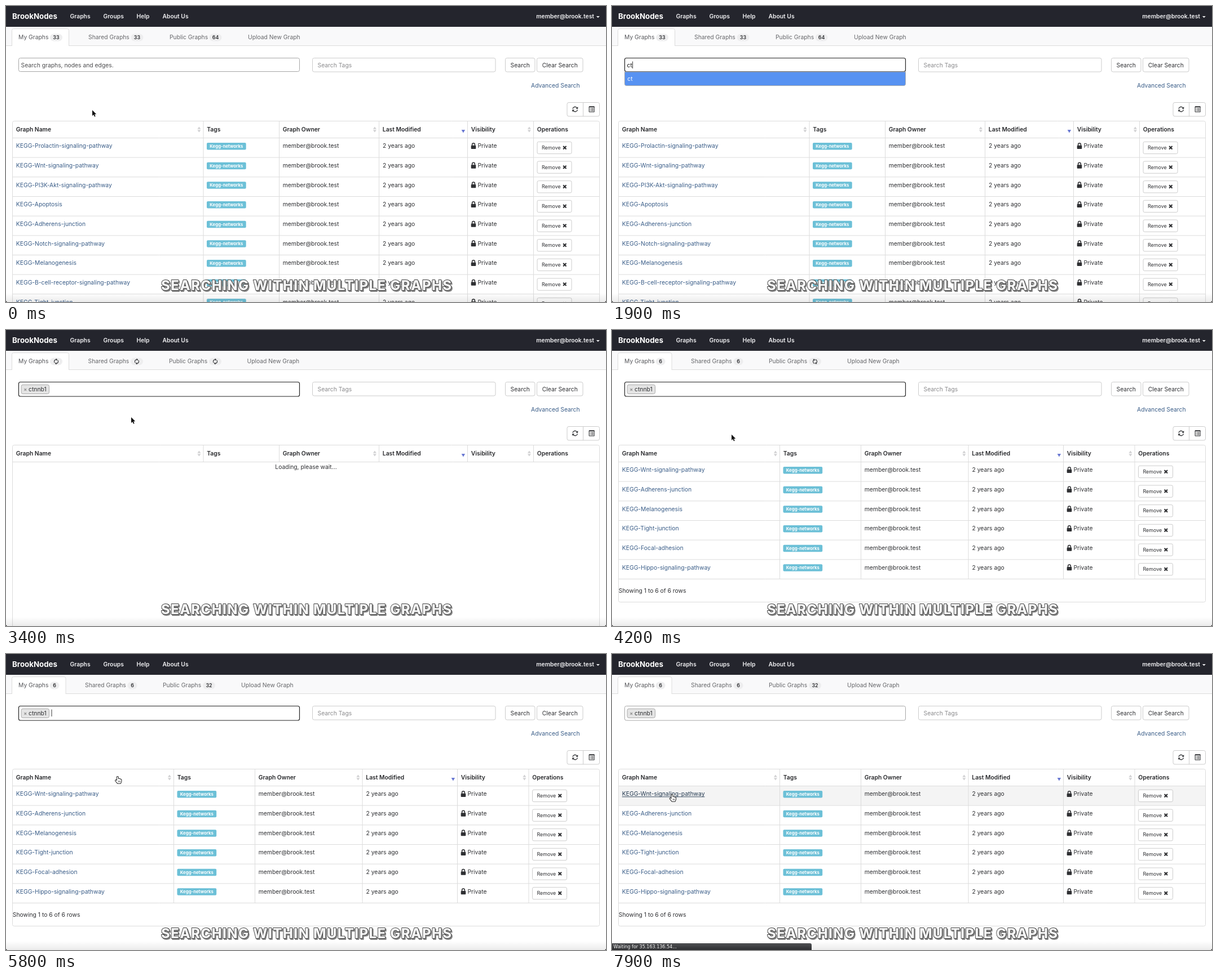
These frames come from a looping animation (1064x526 px, 8000 ms). An HTML page with a canvas:

```html
<!DOCTYPE html>
<html lang="en">
<head>
<meta charset="utf-8">
<title>Searching within multiple graphs</title>
<style>
html, body { margin: 0; width: 100%; height: 100%; overflow: hidden; background: #fff; }
canvas { display: block; width: 1064px; height: 526px; }
</style>
</head>
<body>
<canvas id="stage"></canvas>
<script>
const W = 1064, H = 526, LOOP = 8000, STEP = 100;
const canvas = document.getElementById('stage');
const ctx = canvas.getContext('2d');
const dpr = window.devicePixelRatio || 1;
canvas.width = W * dpr;
canvas.height = H * dpr;

const SANS = 'Inter, "Open Sans", sans-serif';
const BASE = 10.34, SMALL = 8.87;
const INK = '#2f3033', LINK = '#3a5d88', LINE = '#dcdcdc';
const USER = 'member@brook.test';

// Moments of the story, in ms
const T = { click: 1000, type: 1600, key: 160, enter: 3000, rows: 4200, count: 5400, hover: 6450, open: 7100 };

const FULL = {
  cols: [11.5, 350, 484.5, 661.5, 818.5, 935.5, 1052.5],
  rows: ['Prolactin-signaling-pathway', 'Wnt-signaling-pathway', 'PI3K-Akt-signaling-pathway', 'Apoptosis',
    'Adherens-junction', 'Notch-signaling-pathway', 'Melanogenesis', 'B-cell-receptor-signaling-pathway', 'Tight-junction'],
  tabs: [22, 146, 290, 429], badges: [89, 232.5, 371.5], edge: 111.5
};
const BUSY = { cols: FULL.cols, rows: [], tabs: [22, 145.5, 289, 427.5], badges: [89, 232, 371], edge: 111.5 };
const FOUND = {
  cols: [11.5, 297.5, 441.5, 632, 800.5, 927, 1052.5],
  rows: ['Wnt-signaling-pathway', 'Adherens-junction', 'Melanogenesis', 'Tight-junction', 'Focal-adhesion', 'Hippo-signaling-pathway'],
  tabs: [22, 140, 278, 417], badges: [86, 224, 360], edge: 106
};
const HEADS = ['Graph Name', 'Tags', 'Graph Owner', 'Last Modified', 'Visibility', 'Operations'];
const TOP = 234.5, PITCH = 34.67;

// Pointer tip: time, x, y
const PATH = [[0, 153, 185], [200, 153, 185], [900, 114, 110.5], [3000, 114, 110.5], [3400, 222, 155],
  [3900, 222, 155], [4500, 202, 216.5], [5700, 202, 216.5], [6500, 106.5, 250]];

function text(s, x, y, { size = BASE, weight = 400, color = INK, align = 'left', font = SANS } = {}) {
  ctx.font = `${weight} ${size}px ${font}`;
  ctx.fillStyle = color;
  ctx.textAlign = align;
  ctx.fillText(s, x, y + size * 0.36);
  return ctx.measureText(s).width;
}

function box(x, y, w, h, { r = 0, fill, stroke, lw = 1 } = {}) {
  ctx.beginPath();
  ctx.roundRect(x, y, w, h, r);
  if (fill) { ctx.fillStyle = fill; ctx.fill(); }
  if (stroke) { ctx.strokeStyle = stroke; ctx.lineWidth = lw; ctx.stroke(); }
}

function line(x1, y1, x2, y2, color = LINE, lw = 1) {
  ctx.beginPath();
  ctx.moveTo(x1, y1);
  ctx.lineTo(x2, y2);
  ctx.strokeStyle = color;
  ctx.lineWidth = lw;
  ctx.stroke();
}

function shape(points, fill, stroke, lw = 1) {
  ctx.beginPath();
  points.forEach(([x, y]) => ctx.lineTo(x, y));
  ctx.closePath();
  if (stroke) { ctx.strokeStyle = stroke; ctx.lineWidth = lw; ctx.stroke(); }
  ctx.fillStyle = fill;
  ctx.fill();
}

const triangle = (x, y, w, h, color) => shape([[x - w, y], [x + w, y], [x, y + h]], color);

function cross(x, y, r, color, lw) {
  line(x - r, y - r, x + r, y + r, color, lw);
  line(x - r, y + r, x + r, y - r, color, lw);
}

function refresh(x, y, r, angle = 0) {
  ctx.save();
  ctx.translate(x, y);
  ctx.rotate(angle);
  for (let i = 0; i < 2; i++) {
    ctx.beginPath();
    ctx.arc(0, 0, r, Math.PI * 1.06, Math.PI * 1.8);
    ctx.strokeStyle = INK;
    ctx.lineWidth = r * 0.34;
    ctx.stroke();
    shape([[r * 1.2, -r * 1.05], [r * 1.2, -r * 0.15], [r * 0.3, -r * 0.15]], INK);
    ctx.rotate(Math.PI);
  }
  ctx.restore();
}

function lock(x, y) {
  box(x, y - 0.8, 8.6, 6.3, { r: 1, fill: INK });
  ctx.beginPath();
  ctx.moveTo(x + 1.9, y);
  ctx.lineTo(x + 1.9, y - 2.4);
  ctx.arc(x + 4.3, y - 2.4, 2.4, Math.PI, 0);
  ctx.lineTo(x + 6.7, y);
  ctx.strokeStyle = INK;
  ctx.lineWidth = 1.5;
  ctx.stroke();
}

function navbar() {
  box(0, 0, W, 37, { fill: '#24252d' });
  const style = { weight: 600, color: '#f1f1f3' };
  text('BrookNodes', 11, 18.2, { ...style, size: 13.3, weight: 700, color: '#fff' });
  [['Graphs', 113.5], ['Groups', 172.5], ['Help', 231.5], ['About Us', 277.5]]
    .forEach(([s, x]) => text(s, x, 18.5, style));
  text(USER, 1043, 18.5, { ...style, align: 'right' });
  triangle(1049.8, 18, 3, 3, '#f1f1f3');
}

function tabs(view, counts, t) {
  box(0, 37, W, 33.5, { fill: '#f9f9fa' });
  line(0, 70.5, W, 70.5);
  box(10.5, 40.5, view.edge - 10.5, 36, { r: 3, fill: '#fff', stroke: LINE });
  box(9, 71, view.edge - 7, 8, { fill: '#fff' });
  ['My Graphs', 'Shared Graphs', 'Public Graphs', 'Upload New Graph']
    .forEach((s, i) => text(s, view.tabs[i], 55.5, { color: i ? '#66676a' : '#55565a' }));
  view.badges.forEach((x, i) => {
    const n = counts[i], w = n.length === 1 ? 17 : 22;
    box(x - w / 2, 49.5, w, 13, { r: 6.5, fill: '#eeeeef' });
    if (n === '..') refresh(x, 56, 3.5, (t - 4700) / 2000 * Math.PI * 2);
    else text(n, x, 56, { size: SMALL, weight: 600, align: 'center' });
  });
}

function button(s, x, w) {
  box(x, 92.5, w, 24.5, { r: 3, fill: '#fff', stroke: '#ccc' });
  text(s, x + w / 2, 105, { align: 'center' });
}

function searchBar(t) {
  const focus = t >= T.click && t < T.open;
  const tagged = t >= T.enter;
  const typed = 'ctnnb1'.slice(0, Math.max(0, Math.floor((t - T.type) / T.key) + 1));
  const blink = (t + 350) % 1000 < 500;
  box(22.5, 92.5, 498, tagged ? 25.5 : 24, { r: 3, fill: '#fff', stroke: focus ? '#222' : '#a6a6a6', lw: focus ? 1.2 : 1 });
  if (tagged) {
    box(27, 97.3, 49.5, 16.2, { r: 3, fill: '#e4e4e4', stroke: '#aaa' });
    cross(34.3, 106, 1.8, '#8b8b8b', 1.2);
    text('ctnnb1', 40, 105.7);
    if (focus && blink) line(81, 98.5, 81, 111, '#222', 0.9);
  } else if (typed) {
    const w = text(typed, 26.5, 105, { color: '#111' });
    if (blink || t < T.type + 6 * T.key) line(27.3 + w, 98.5, 27.3 + w, 111, '#222', 0.9);
  } else {
    text('Search graphs, nodes and edges.', 26.5, 105, { color: focus ? '#666' : '#4c4c4e' });
    if (focus && blink) line(27, 98.5, 27, 111, '#222', 0.9);
  }
  box(543.5, 92.5, 324.5, 24.5, { r: 3, fill: '#fff', stroke: '#ccc' });
  text('Search Tags', 552.5, 105, { color: '#8a8a8c' });
  button('Search', 885.5, 52.5);
  button('Clear Search', 941.5, 81.5);
  text('Advanced Search', 931, 141, { color: LINK });
  if (focus && !tagged) {
    box(22.5, 117, 498, 24.5, { r: [0, 0, 3, 3], fill: typed ? '#5792f2' : '#fff', stroke: '#aaa' });
    text(typed || 'No results found', 27.3, 129.3, { color: typed ? '#fff' : INK });
  }
}

function toolbar() {
  box(995, 171.5, 57.5, 24.5, { r: 3, fill: '#fff', stroke: '#ccc' });
  line(1023.5, 171.5, 1023.5, 196, '#ccc');
  refresh(1009.2, 183.5, 4.2);
  box(1034, 178.8, 9.2, 9.4, { stroke: INK });
  line(1034, 179.3, 1043.2, 179.3, INK, 1.6);
  for (let y = 182; y < 188; y += 2) {
    line(1035.3, y, 1036.5, y, INK, 0.9);
    line(1037.4, y, 1042, y, INK, 0.9);
  }
}

function row(view, name, i, hover) {
  const y = TOP + i * PITCH, mid = y + 14, c = view.cols;
  if (hover) box(12, y + 0.5, 1040, PITCH - 1, { fill: '#f4f4f4' });
  const color = hover ? '#22384f' : LINK;
  const w = text('KEGG-' + name, c[0] + 6.3, mid, { color });
  if (hover) line(c[0] + 6.3, mid + 5.3, c[0] + 6.3 + w, mid + 5.3, color, 0.9);
  box(c[1] + 6, mid - 5.5, 69.7, 12.5, { r: 2, fill: '#6cc0d7' });
  text('Kegg-networks', c[1] + 40.9, mid + 0.8, { size: 7.76, weight: 700, color: '#fff', align: 'center' });
  text(USER, c[2] + 6.3, mid);
  text('2 years ago', c[3] + 6.5, mid);
  lock(c[4] + 6.2, mid);
  text('Private', c[4] + 18, mid);
  box(c[5] + 6.5, y + 6.8, 61, 21.3, { r: 2.5, fill: '#fff', stroke: '#ccc' });
  text('Remove', c[5] + 14.5, y + 17.4, { size: SMALL });
  cross(c[5] + 55.3, y + 17.2, 2.7, INK, 2.1);
  line(c[0], y + PITCH, c[6], y + PITCH);
}

function table(view, t) {
  const c = view.cols;
  const found = view === FOUND, busy = view === BUSY;
  const end = found ? 483.5 : 540;
  box(11.5, 204.5, 1041, end - 204.5, { r: 3, stroke: LINE });
  view.rows.forEach((name, i) => row(view, name, i, found && i === 0 && t >= T.hover - 50));
  line(11.5, TOP, 1052.5, TOP);
  const bottom = busy ? TOP : found ? TOP + 6 * PITCH : H;
  c.slice(1, 6).forEach(x => line(x, 204.5, x, bottom));
  HEADS.forEach((s, i) => {
    text(s, c[i] + 6.3, 219.5, { weight: 600, color: '#26272a' });
    const x = c[i + 1] - 7.6;
    if (i === 3) triangle(x, 220, 3.2, 5.5, '#6877d2');
    else if (i === 0 || i === 2 || i === 4) {
      triangle(x, 218.8, 3, -4.2, '#d0d0d2');
      triangle(x, 220.3, 3, 4.2, '#d0d0d2');
    }
  });
  if (busy) text('Loading, please wait...', 532, 243.3, { align: 'center' });
  if (found) text('Showing 1 to 6 of 6 rows', 11.8, 463.3);
}

function shade() {
  const g = ctx.createLinearGradient(0, 510, 0, H);
  g.addColorStop(0, 'rgba(0,0,0,0)');
  g.addColorStop(1, 'rgba(0,0,0,.08)');
  box(0, 510, W, 16, { fill: g });
  shape([[0, 524], [2, 526], [0, 526]], '#222');
  shape([[W, 524], [W - 2, 526], [W, 526]], '#222');
}

function statusBar(t) {
  if (t < T.hover) return;
  const g = ctx.createLinearGradient(0, 514, 0, H);
  g.addColorStop(0, '#505154');
  g.addColorStop(1, '#2c2d30');
  box(0, 514, 354, 12, { r: [0, 3, 0, 0], fill: g });
  text(t < T.open ? '35.163.136.54/graphs/11761?query=ctnnb1' : 'Waiting for 35.163.136.54...', 2.5, 520,
    { size: 8, color: '#f4f4f4', font: '"DejaVu Sans", sans-serif' });
}

function caption() {
  const s = 'SEARCHING WITHIN MULTIPLE GRAPHS', x = 275, y = 505;
  ctx.save();
  ctx.font = `800 24px ${SANS}`;
  ctx.letterSpacing = '1.4px';
  ctx.textAlign = 'left';
  ctx.lineJoin = 'round';
  ctx.lineWidth = 1.8;
  ctx.strokeStyle = ctx.fillStyle = '#858585';
  ctx.fillText(s, x + 2.2, y + 2.2);
  ctx.strokeText(s, x + 1.6, y + 1.6);
  ctx.strokeStyle = '#404040';
  ctx.strokeText(s, x, y);
  ctx.fillStyle = '#f5f5f5';
  ctx.fillText(s, x, y);
  ctx.restore();
}

function pointerAt(t) {
  const i = PATH.findIndex(p => p[0] > t);
  if (i < 0) return PATH[PATH.length - 1].slice(1);
  const [t0, x0, y0] = PATH[i - 1], [t1, x1, y1] = PATH[i];
  const u = (t - t0) / (t1 - t0), k = u * u * (3 - 2 * u);
  return [x0 + (x1 - x0) * k, y0 + (y1 - y0) * k];
}

function arrow() {
  shape([[0, 0], [0, 10.2], [2.3, 8.1], [4, 11.8], [5.7, 11], [4.1, 7.4], [7.2, 7.2]], '#111', '#fff', 1.6);
}

function beam() {
  for (const [color, lw] of [['#fff', 2.4], ['#222', 1.1]]) {
    line(0, -5, 0, 5.5, color, lw);
    for (const d of [-1, 1]) {
      line(-2.6, d * 6.3, 0, d * 5, color, lw);
      line(2.6, d * 6.3, 0, d * 5, color, lw);
    }
  }
}

function hand() {
  ctx.lineJoin = 'round';
  shape([[-1, 0.2], [0.8, 0.2], [1, 4], [2.6, 3.6], [3.2, 4.4], [4.6, 4.2], [5.1, 5], [6.4, 5.2], [6.6, 8],
    [5.3, 11.8], [0, 11.8], [-3.8, 7.2], [-3.2, 6], [-1, 7.4]], '#fff', '#222', 2);
  [1.6, 3, 4.4].forEach(x => line(x, 7.2, x, 9.8, '#444', 0.7));
}

function pointer(t) {
  if (t >= T.type && t < T.enter + 100) return;
  const [x, y] = pointerAt(t);
  const inField = y > 92 && y < 118;
  const onHead = y > 204 && y < TOP && t > T.rows;
  ctx.save();
  ctx.translate(x, y);
  if (inField) beam();
  else if (onHead || t >= T.hover - 50) hand();
  else arrow();
  ctx.restore();
}

function draw(t) {
  const view = t < T.enter ? FULL : t < T.rows ? BUSY : FOUND;
  const counts = view === FULL ? ['33', '33', '64'] : view === BUSY ? ['..', '..', '..']
    : ['6', '6', t < T.count ? '..' : '32'];
  ctx.setTransform(dpr, 0, 0, dpr, 0, 0);
  box(0, 0, W, H, { fill: '#fff' });
  navbar();
  tabs(view, counts, t);
  toolbar();
  searchBar(t);
  table(view, t);
  shade();
  statusBar(t);
  caption();
  pointer(t);
}

const start = performance.now();
function tick() {
  const t = Math.max(0, performance.now() - start) % LOOP;
  draw(Math.floor(t / STEP) * STEP);
  requestAnimationFrame(tick);
}
tick();
</script>
</body>
</html>
```
